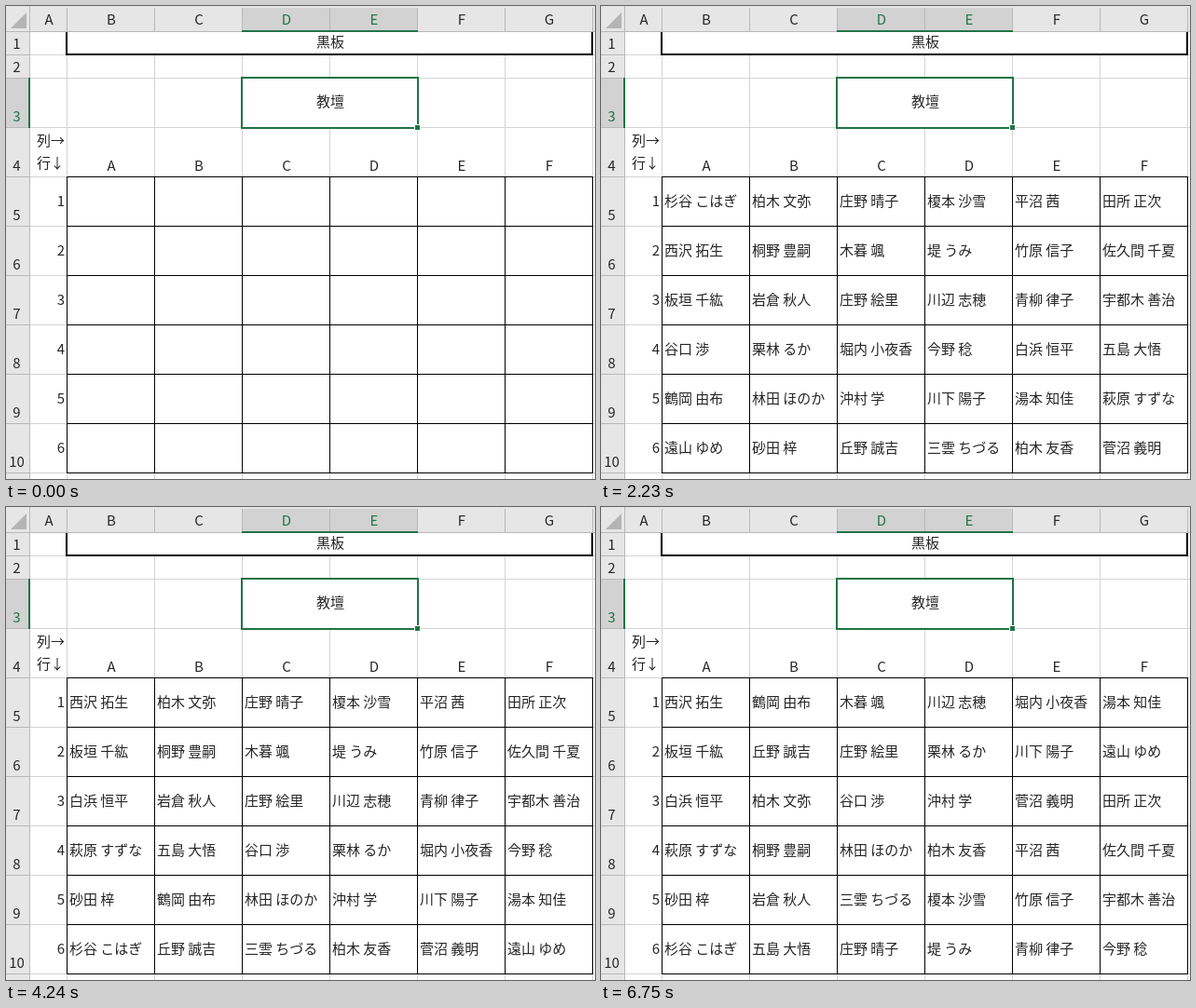
These frames come from a looping animation (632 by 508 pixels, 8.18 s). An HTML page with a canvas:

```html
<!DOCTYPE html>
<html lang="ja">
<head>
<meta charset="utf-8">
<title>席替え</title>
<style>
  html, body { margin: 0; width: 100%; height: 100%; overflow: hidden; background: #fff; }
  canvas { display: block; }
</style>
</head>
<body>
<canvas id="sheet" width="632" height="508" lang="ja"></canvas>
<script>
const ctx = document.getElementById('sheet').getContext('2d');
const W = 632, H = 508, LOOP = 8180, N = 6;
const INK = '#262626', GREEN = '#217346', GRID = '#d4d4d4';
const HEAD = '#e6e6e6', HEAD_ON = '#d2d2d2', EDGE = '#b8b8b8';
const LEFT = 65, TOP = 183, CELL_W = 94, CELL_H = 53;
const colX = i => LEFT + i * CELL_W;
const rowY = i => TOP + i * CELL_H;
const colLines = [25, ...Array.from({ length: N + 1 }, (_, i) => colX(i))];
const rowLines = [27, 52, 77, 130, ...Array.from({ length: N + 1 }, (_, i) => rowY(i))];

const seats = [
  '田所 正次,杉谷 こはぎ,柏木 文弥,庄野 晴子,榎本 沙雪,平沼 茜',
  '竹原 信子,佐久間 千夏,西沢 拓生,桐野 豊嗣,木暮 颯,堤 うみ',
  '川辺 志穂,青柳 律子,宇都木 善治,板垣 千紘,岩倉 秋人,庄野 絵里',
  '谷口 渉,栗林 るか,堀内 小夜香,今野 稔,白浜 恒平,五島 大悟',
  '鶴岡 由布,林田 ほのか,沖村 学,川下 陽子,湯本 知佳,萩原 すずな',
  '遠山 ゆめ,砂田 梓,丘野 誠吉,三雲 ちづる,柏木 友香,菅沼 義明'
].map(row => row.split(','));

// Rows rotate left first, then columns rotate up.
const APPEAR = 740;
const rowTimes = [1230, 1730, 2230, 2730, 3230, 3740];
const rowShifts = [1, 2, 3, 4, 5, 1];
const colTimes = [4240, 4740, 5250, 5750, 6250, 6750];
const colShifts = [1, 4, 1, 2, 3, 4];

const rotate = (list, n) => [...list.slice(n), ...list.slice(0, n)];

function seating(t) {
  const grid = seats.map((row, r) => t >= rowTimes[r] ? rotate(row, rowShifts[r]) : [...row]);
  colTimes.forEach((time, c) => {
    if (t < time) return;
    rotate(grid.map(row => row[c]), colShifts[c]).forEach((name, r) => { grid[r][c] = name; });
  });
  return grid;
}

function box(x, y, w, h, color) {
  ctx.fillStyle = color;
  ctx.fillRect(x, y, w, h);
}

function text(s, x, y, align = 'center', color = INK) {
  ctx.textAlign = align;
  ctx.fillStyle = color;
  ctx.fillText(s, x, y);
}

function drawGridLines() {
  colLines.forEach(x => box(x, 28, 1, H, GRID));
  rowLines.forEach(y => box(26, y, W, 1, GRID));
  // merged cells
  box(66, 28, 563, 24, '#fff');
  box(254, 78, 187, 52, '#fff');
}

function drawHeaders() {
  box(0, 0, W, 27, HEAD);
  box(0, 0, 25, H, HEAD);
  box(254, 2, 187, 25, HEAD_ON);
  box(0, 78, 25, 52, HEAD_ON);
  colLines.forEach(x => box(x, 2, 1, 25, EDGE));
  rowLines.forEach(y => box(0, y, 25, 1, EDGE));
  box(0, 27, W, 1, EDGE);
  box(25, 0, 1, H, EDGE);

  ctx.fillStyle = '#b4b4b4';
  ctx.beginPath();
  ctx.moveTo(22, 7);
  ctx.lineTo(22, 24);
  ctx.lineTo(5, 24);
  ctx.fill();

  box(253, 26, 189, 2, GREEN);
  box(24, 77, 2, 54, GREEN);

  text('A', 46, 20);
  [...'BCDEFG'].forEach((s, i) =>
    text(s, colX(i) + 48, 20, 'center', i === 2 || i === 3 ? GREEN : INK));
  rowLines.slice(1).forEach((y, i) =>
    text(i + 1, 11.5, y - 6, 'center', i === 2 ? GREEN : INK));
}

function drawBorders() {
  box(64, 28, 2, 25, '#000');
  box(628, 28, 2, 25, '#000');
  box(64, 51, 566, 2, '#000');
  for (let i = 0; i <= N; i++) {
    box(colX(i), TOP, 1, N * CELL_H + 1, '#000');
    box(LEFT, rowY(i), N * CELL_W + 1, 1, '#000');
  }
  ctx.strokeStyle = GREEN;
  ctx.lineWidth = 2;
  ctx.strokeRect(253, 77, 189, 54);
  box(438, 127, 7, 7, '#fff');
  box(439, 128, 5, 5, GREEN);
}

function drawLabels() {
  text('黒板', 348, 44);
  text('教壇', 348, 108);
  text('列→', 33, 150, 'left');
  text('行', 33, 174, 'left');
  text('↓', 55, 174);
  [...'ABCDEF'].forEach((s, i) => text(s, colX(i) + 48, 177));
  for (let r = 0; r < N; r++) text(r + 1, 63, rowY(r) + 32, 'right');
}

function draw(t) {
  ctx.font = '300 15px "Noto Sans CJK JP Light", "Noto Sans CJK JP", "Noto Sans CJK", sans-serif';
  box(0, 0, W, H, '#fff');
  drawGridLines();
  drawHeaders();
  drawBorders();
  drawLabels();
  if (t < APPEAR) return;
  seating(t).forEach((row, r) =>
    row.forEach((name, c) => text(name, colX(c) + 3, rowY(r) + 32, 'left')));
}

function frame(now) {
  draw(now % LOOP);
  requestAnimationFrame(frame);
}
draw(0);
requestAnimationFrame(frame);
</script>
</body>
</html>
```
